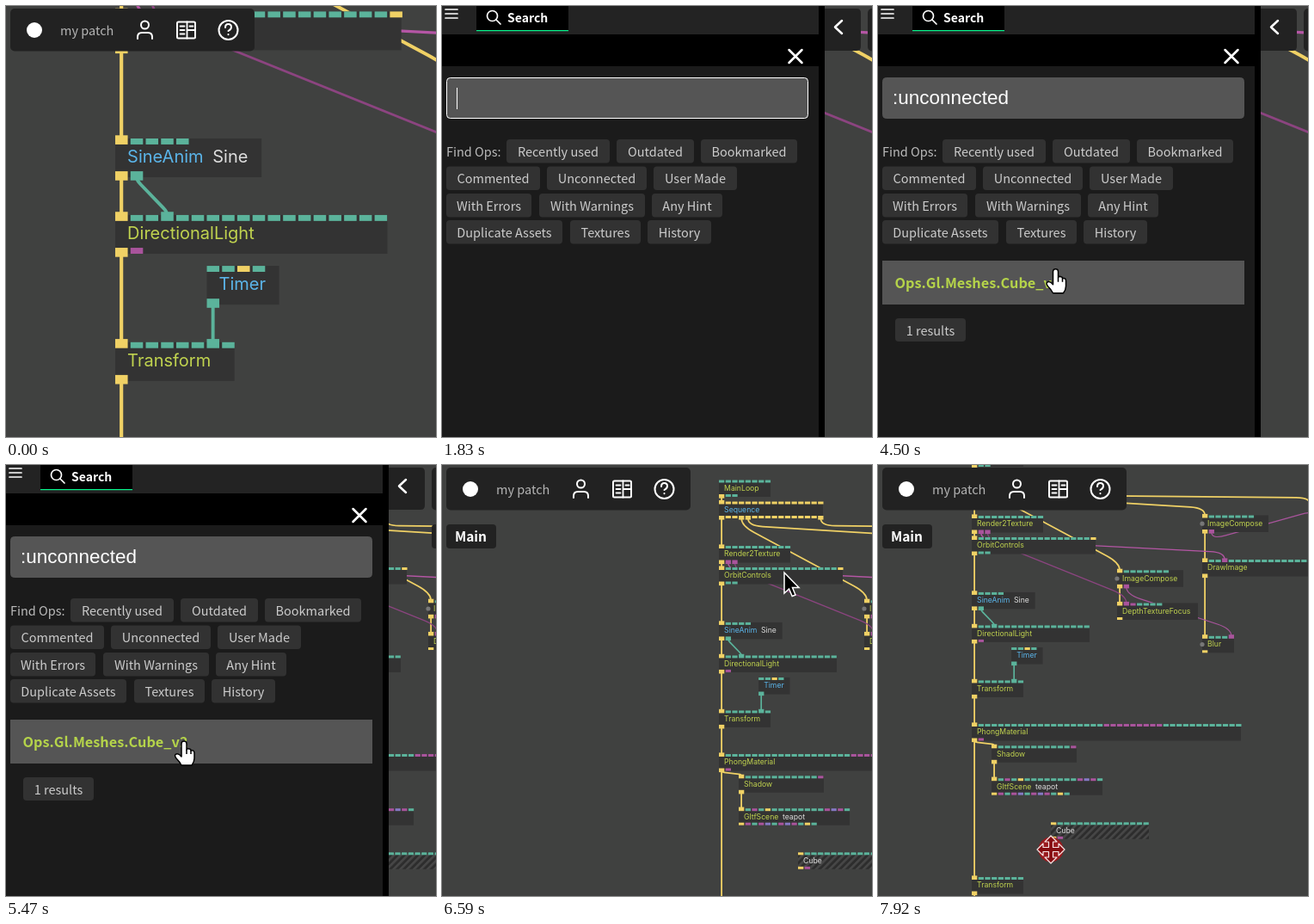
Write an HTML page that moves like this. It is 500 px wide and 501 px high and loops after 7.99 s.

```html
<!DOCTYPE html>
<html lang="en">
<head>
<meta charset="utf-8">
<title>Patch search</title>
<style>
html, body { margin: 0; width: 100%; height: 100%; overflow: hidden; background: #404140; }
svg { display: block; width: 500px; height: 501px; }
text { font: 14.5px "Noto Sans CJK JP", "Noto Sans CJK SC", "Open Sans", sans-serif; fill: #ccc; }
.op text { font: 8.66px Inter, sans-serif; }
.line { fill: none; stroke-linecap: round; stroke-linejoin: round; }
</style>
</head>
<body>
<svg id="stage" viewBox="0 0 500 501">
  <defs>
    <pattern id="hatch" width="5.6" height="5.6" patternUnits="userSpaceOnUse" patternTransform="rotate(45)">
      <rect width="5.6" height="5.6" fill="#2d2d2d"/><rect width="2.6" height="5.6" fill="#474747"/>
    </pattern>
  </defs>
  <rect width="500" height="501" fill="#404140"/>
  <g id="patch"><g id="links"></g><g id="ops"></g></g>
  <g id="bar">
    <rect x="5" y="3" width="284" height="49.500" rx="5" fill="#222"/>
    <circle cx="33" cy="28" r="9" fill="#fff"/>
    <text x="63" y="33.500" style="fill:#b4b4b4">my patch</text>
    <g class="line" stroke="#fff" stroke-width="2">
      <circle cx="161.500" cy="22" r="4.500"/>
      <path d="M153 38v-2q0-5 5-5h7q5 0 5 5v2"/>
      <rect x="199" y="18.500" width="21" height="19" rx="1.500"/>
      <path d="M210.500 18.500v19M210.500 28h9M202.500 23.500h5M202.500 28h5M202.500 32.500h5M213.500 23.500h4" stroke-width="1.800"/>
      <circle cx="258.500" cy="28" r="11"/>
      <path d="M255 25q0-4 3.500-4t3.500 3.500q0 2.500-3.500 4.500M258.500 33v.3"/>
    </g>
    <g id="crumb">
      <rect x="5" y="69" width="58" height="28" rx="4" fill="#222"/>
      <text x="33.500" y="88.500" text-anchor="middle" style="font-size:15.500px;font-weight:700;fill:#fff">Main</text>
    </g>
  </g>
  <g id="panel">
    <rect width="438" height="501" fill="#1b1b1b"/>
    <rect width="438" height="33" fill="#232323"/>
    <rect y="33" width="438" height="37" fill="#000"/>
    <rect x="438" width="7" height="501" fill="#000"/>
    <rect x="40" width="107" height="29" fill="#000"/>
    <rect x="40" y="28" width="107" height="1.200" fill="#07f58c"/>
    <path d="M445 3h37q5 0 5 5v39q0 5-5 5h-37z" fill="#222"/>
    <g class="line" stroke="#fff" stroke-width="2">
      <path d="M4 4h14M4 9h14M4 14h14" stroke-width="1.700"/>
      <circle cx="58.500" cy="11.500" r="6" stroke-width="1.700"/><path d="M63 16l5 5" stroke-width="1.700"/>
      <path d="M403.500 51l15 15M418.500 51l-15 15M465 17l-8 7.500 8 7.500" stroke-width="2.500"/>
    </g>
    <text x="76" y="18.500" style="font-size:14px;font-weight:700;fill:#fff">Search</text>
    <rect id="field" x="5.500" y="83.500" width="420" height="47" rx="4" fill="#555"/>
    <rect id="caret" x="17" y="95" width="1" height="25" fill="#fff"/>
    <text id="query" x="17" y="114" style="font:22.500px 'Liberation Sans',Arial,sans-serif;fill:#fff">:unconnected</text>
    <text x="5" y="175" style="fill:#bbb">Find Ops:</text>
    <g id="chips"></g>
    <g id="hint">
      <rect x="5" y="296" width="421" height="20" fill="#232323"/>
      <text x="5" y="312" style="fill:#bbb">Type some more!</text>
    </g>
    <g id="result">
      <rect id="row" x="5" y="296" width="421" height="51"/>
      <text x="19.500" y="328" style="font-size:16.300px;font-weight:700;fill:#b5d44a">Ops.Gl.Meshes.Cube_v2</text>
      <rect x="20" y="363" width="82" height="27" rx="4" fill="#323232"/>
      <text x="61" y="382.500" text-anchor="middle">1 results</text>
    </g>
  </g>
  <g id="cursor">
    <path id="arrow" d="M0 0V24L5.500 19L9.200 27.500L13 26L9.500 17.600H17Z" fill="#000" stroke="#fff" stroke-width="1.500"/>
    <g id="hand" stroke="#000" stroke-width="1.500" stroke-linejoin="round">
      <path d="M-3 3Q-3 0 0 0Q3 0 3 3V10Q4 8 6 9Q8 9 8 11Q12 10 12 14V20Q12 24 9 28H-3Q-5 24-9 20Q-12 16-9 15Q-6 14-3 18Z" fill="#fff"/>
      <path d="M3 10V15M8 11V15" fill="none"/>
    </g>
    <g id="move">
      <circle r="14.500" fill="#a3161a" opacity=".9"/>
      <path id="fleur" fill="#860d11" stroke="#f6e4e4" stroke-width="1.200" stroke-linejoin="round"/>
    </g>
  </g>
</svg>
<script>
const $ = id => document.getElementById(id);
const add = (parent, tag, attrs, text) => {
  const e = document.createElementNS('http://www.w3.org/2000/svg', tag);
  for (const k in attrs) e.setAttribute(k, attrs[k]);
  if (text) e.textContent = text;
  return parent.appendChild(e);
};
const show = (id, on) => { $(id).style.display = on ? '' : 'none'; };

// Patch: ports are letters with an optional count, capitals are connected.
const PITCH = 7.68, OP_H = 19.5, FIRST = 3.1;
const COLORS = { y: '#f0d165', g: '#5bb39b', p: '#a9549c', u: '#8579c4' };
const LIME = '#c0d34f', BLUE = '#5bb5ea', WHITE = '#ddd';
const OPS = {
  loop: [322, 17.5, 60, 'MainLoop', LIME, 'g8', 'Yg2'],
  seq: [322, 42.5, 121, 'Sequence', BLUE, 'Yy15', 'Yy2Y2y10Y'],
  tex: [322, 94, 83, 'Render2Texture', LIME, 'Yg10', 'YP2'],
  orbit: [322, 119, 144, 'OrbitControls', LIME, 'Yg17y', 'Yg2'],
  sine: [322, 182.9, 73.6, 'SineAnim', BLUE, 'Yg4', 'YG', 'Sine'],
  light: [322, 221.4, 137, 'DirectionalLight', LIME, 'Yg2Gg14', 'Yp'],
  timer: [368.1, 247, 36.4, 'Timer', BLUE, 'g2yg', 'G'],
  trans: [322, 285.4, 60, 'Transform', LIME, 'Yg5Gg', 'Y'],
  phong: [322, 336, 313, 'PhongMaterial', LIME, 'Yg19p9g12', 'Yp'],
  shadow: [345, 361.3, 99, 'Shadow', LIME, 'Yg11p', 'Y'],
  gltf: [345, 399.2, 129, 'GltfScene', LIME, 'Ygpgyg8pupg', 'ypgpugpupgyg', 'teapot'],
  cube: [414, 450.3, 114, 'Cube', WHITE, 'yg14', 'yp'],
  trans2: [322, 514, 60, 'Transform', LIME, 'Yg7', 'Y'],
  compA: [491, 157.3, 77, 'ImageCompose', LIME, 'Yg7', 'YP'],
  depth: [491, 195.5, 94, 'DepthTextureFocus', LIME, 'YPpg4', 'y'],
  compB: [590, 93.5, 77, 'ImageCompose', LIME, 'Yg7', 'YP'],
  draw: [590, 145, 140, 'DrawImage', LIME, 'Yg2Pg14', 'Y'],
  blur: [590, 233.8, 37, 'Blur', LIME, 'Yg3P', 'y'],
};
const DOTTED = ['compA', 'compB', 'blur'];

function drawPorts(g, x, y, spec, out) {
  let i = 0;
  for (const [, c, n] of spec.matchAll(/([a-z])(\d*)/gi)) {
    const key = c.toLowerCase(), h = c === key ? 3 : 4.6;
    for (let k = 0; k < (+n || 1); k++, i++) {
      add(g, 'rect', {
        x: x + i * PITCH, y: out ? y + OP_H - 3 : y + 3 - h,
        width: 6.3, height: h, fill: COLORS[key]
      });
    }
  }
}
for (const [key, [x, y, w, name, color, ins, outs, title]] of Object.entries(OPS)) {
  const g = add($('ops'), 'g', { class: 'op' });
  add(g, 'rect', { x, y, width: w, height: OP_H, fill: key === 'cube' ? 'url(#hatch)' : '#333' });
  drawPorts(g, x, y, ins, false);
  drawPorts(g, x, y, outs, true);
  if (DOTTED.includes(key)) add(g, 'circle', { cx: x, cy: y + 9.7, r: 2.6, fill: '#777' });
  const label = add(g, 'text', { x: x + 6.1, y: y + 12.3, style: 'fill:' + color }, name);
  if (title) add(label, 'tspan', { dx: 4.6, fill: WHITE }, title);
}

// A cable drops by h, runs straight, then drops by h again, with rounded bends.
function cable(x1, y1, x2, y2, color, width = 1.7, h = 8.5) {
  const dx = x2 - x1, dy = y2 - y1 - 2 * h, len = Math.hypot(dx, dy) || 1;
  const r = Math.min(2 * h, len / 2), ux = dx / len * r, uy = dy / len * r;
  add($('links'), 'path', {
    d: `M${x1} ${y1}Q${x1} ${y1 + h} ${x1 + ux} ${y1 + h + uy}` +
      `L${x2 - ux} ${y2 - h - uy}Q${x2} ${y2 - h} ${x2} ${y2}`,
    class: 'line', stroke: color, 'stroke-width': width
  });
}
const portX = (op, i) => OPS[op][0] + FIRST + i * PITCH;
const link = (a, i, b, j, color, width, h) =>
  cable(portX(a, i), OPS[a][1] + OP_H, portX(b, j), OPS[b][1], color, width, h);

const CHAINS = ['loop seq tex orbit sine light trans phong trans2', 'shadow gltf', 'compA depth', 'compB draw blur'];
for (const chain of CHAINS) {
  chain.split(' ').forEach((b, i, all) => i && link(all[i - 1], 0, b, 0, COLORS.y, 1.8, 0));
}
link('phong', 0, 'shadow', 0, COLORS.y, 1.7, 1.5);
link('seq', 3, 'compA', 0, COLORS.y);
link('seq', 4, 'compB', 0, COLORS.y);
cable(portX('seq', 15), 62, 716, 81.5, COLORS.y);
cable(portX('trans2', 0), 533, portX('trans2', 0), 640, COLORS.y, 1.8, 0);
link('sine', 1, 'light', 3, COLORS.g, 1.7, 1.5);
link('timer', 0, 'trans', 6, COLORS.g, 1.7, 0);
link('tex', 1, 'draw', 3, '#b556a5', 1.4);
link('tex', 2, 'depth', 1, '#8c4480', 1.2);
link('compA', 1, 'blur', 4, '#a9549c', 1.2);
cable(portX('compB', 1), 113, 722, 96, '#a9549c', 1.2);

// Search filters: label, left, right per row.
const ROWS = [
  [155, ['Recently used', 75, 195], ['Outdated', 203, 293], ['Bookmarked', 301, 413]],
  [186.5, ['Commented', 5, 114], ['Unconnected', 122, 238], ['User Made', 246, 343]],
  [218, ['With Errors', 5, 104], ['With Warnings', 113, 236], ['Any Hint', 244, 326]],
  [249, ['Duplicate Assets', 5, 140], ['Textures', 149, 231], ['History', 239, 313]],
];
const chips = ROWS.flatMap(([y, ...items]) => items.map(([label, x, right]) => ({
  x, y, right, bottom: y + 28,
  box: add($('chips'), 'rect', { x, y, width: right - x, height: 27.5, rx: 4 }),
  text: add($('chips'), 'text', { x: (x + right) / 2, y: y + 19.5, 'text-anchor': 'middle' }, label)
})));
const ROW_AREA = { x: 5, y: 296, right: 426, bottom: 347 };
const CLOSE_AREA = { x: 399, y: 46, right: 423, bottom: 70 };
const inside = (a, x, y) => x >= a.x && x < a.right && y >= a.y && y < a.bottom;

// Four-way cursor from one quarter, turned three times.
let quarter = [[0, -16], [7, -9], [2.5, -9], [2.5, -2.5], [9, -2.5], [9, -7]], fleur = [];
for (let i = 0; i < 4; i++) {
  fleur.push(...quarter);
  quarter = quarter.map(([x, y]) => [-y, x]);
}
$('fleur').setAttribute('d', 'M' + fleur.join('L') + 'Z');

const LOOP = 7990, OPEN = 1830, CLICK = 3480, FILLED = 3550, FOUND = 3620,
  PICK = 4840, CLOSED = 6240, GRAB = 7290, STEP = 70;
const POINTER = [
  [2500, 367, 510], [2570, 362, 490], [2780, 315, 390], [3000, 250, 270], [3150, 218, 220], [3280, 207, 204],
  [4170, 207, 204], [4290, 206, 225], [4430, 206, 290], [4570, 207, 321],
  [5470, 207, 321], [5610, 240, 282], [5820, 345, 140], [5960, 403, 66], [6030, 410, 58],
  [6310, 410, 58], [6450, 405, 67], [6520, 403, 90], [6590, 398, 125],
  [6800, 420, 255], [7010, 438, 400], [7150, 410, 464], [7290, 385, 481],
  [7360, 382, 480], [7500, 370, 477], [7640, 345, 473], [7710, 320, 468], [7920, 201, 447],
];
const DRAG = [
  [7290, 0, 0], [7360, -3, -1], [7500, -15, -4], [7640, -40, -8],
  [7710, -68, -13], [7780, -112, -20], [7920, -213, -35],
];
function along(table, t) {
  if (t <= table[0][0]) return table[0].slice(1);
  const i = table.findIndex(p => p[0] > t);
  if (i < 0) return table[table.length - 1].slice(1);
  const a = table[i - 1], b = table[i], k = (t - a[0]) / (b[0] - a[0]);
  return [a[1] + (b[1] - a[1]) * k, a[2] + (b[2] - a[2]) * k];
}
const NEAR = { s: 2.31, x: -616.8, y: -268.5 };

function render(time) {
  const t = time < PICK ? time : PICK + Math.floor((time - PICK) / STEP) * STEP;
  const open = t >= OPEN && t < CLOSED;
  const [px, py] = along(POINTER, t), [dx, dy] = along(DRAG, t);

  const k = Math.min(1, Math.max(0, (t - PICK + STEP) / 560));
  const far = t < PICK ? 0 : k * k * (3 - 2 * k), near = 1 - far;
  $('patch').setAttribute('transform',
    `translate(${NEAR.x * near + dx} ${NEAR.y * near + dy}) scale(${1 + (NEAR.s - 1) * near})`);

  $('bar').setAttribute('transform', `translate(${open ? 490 : 0} 0)`);
  show('crumb', t >= PICK);
  show('panel', open);
  show('caret', t < 2370 || (t >= 2870 && t < 3280));
  show('query', t >= FILLED);
  show('hint', t >= CLICK && t < FOUND);
  show('result', t >= FOUND);
  $('field').setAttribute('stroke', t < FILLED ? '#fff' : '#555');

  let over = open && (inside(CLOSE_AREA, px, py) || (t >= FOUND && inside(ROW_AREA, px, py)));
  $('row').setAttribute('fill', inside(ROW_AREA, px, py) ? '#555' : '#333');
  for (const c of chips) {
    const hot = inside(c, px, py);
    over = over || (open && hot);
    c.box.setAttribute('fill', hot ? '#555' : '#323232');
    c.text.style.fill = hot ? '#12e889' : '#ccc';
  }
  const grab = t >= GRAB;
  show('cursor', t >= 2570);
  show('move', grab);
  show('hand', over && !grab);
  show('arrow', !over && !grab);
  $('cursor').setAttribute('transform', `translate(${px} ${py})`);
}
const start = performance.now();
function tick() {
  render((performance.now() - start) % LOOP);
  requestAnimationFrame(tick);
}
tick();
</script>
</body>
</html>
```
